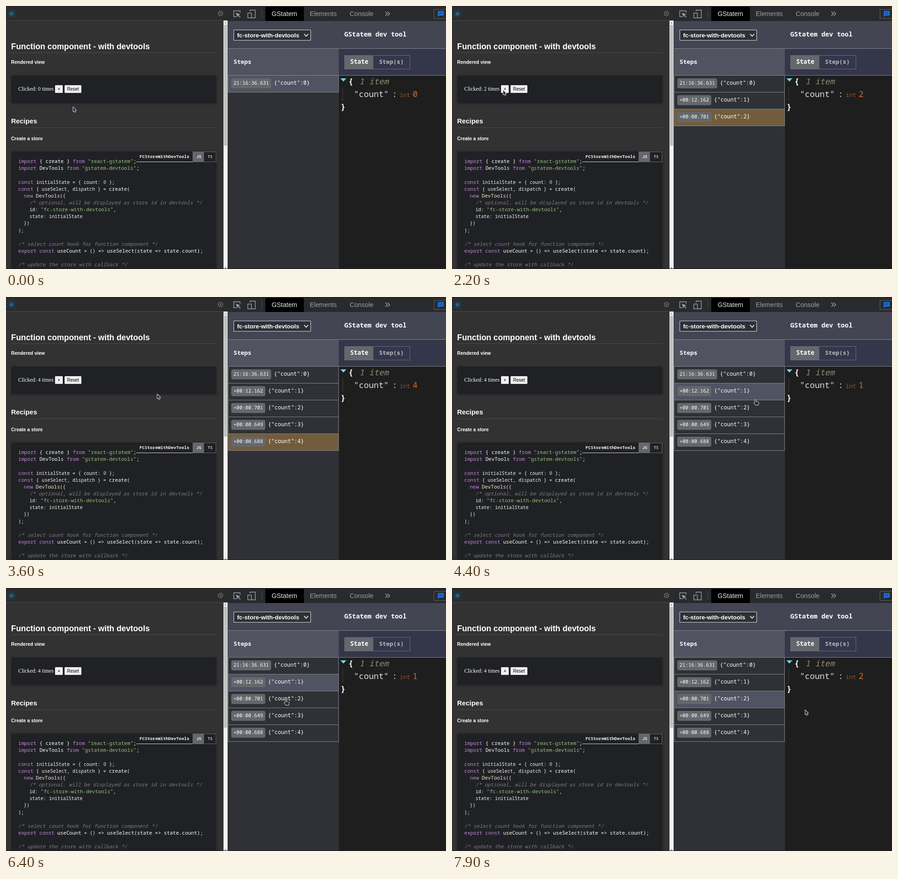
Animation of 969x578 px, one loop 8 s. Source, as an HTML page with a canvas:

```html
<!DOCTYPE html>
<html lang="en">
<head>
<meta charset="utf-8">
<title>Store with dev tools</title>
<style>
  html, body { margin: 0; width: 100%; height: 100%; overflow: hidden; background: #323232; }
  canvas { display: block; }
</style>
</head>
<body>
<canvas id="stage" width="969" height="578"></canvas>
<script>
const ctx = document.getElementById('stage').getContext('2d');
const LOOP = 8000, STEP = 100;
const MONO = '"Noto Sans Mono", "DejaVu Sans Mono", monospace';
const SANS = '"Liberation Sans", Arial, sans-serif';
const SERIF = '"Liberation Serif", "Times New Roman", serif';
const LINE = '#85878d', CHIP = '#64676c', PICKED = [80, 83, 97], FLASH = [150, 101, 25];

// Time at which each step is dispatched, and its label.
const STEPS = [
  [-LOOP, '21:16:36.631'], [1000, '+00:12.162'], [1700, '+00:00.701'],
  [2400, '+00:00.649'], [3100, '+00:00.688']
];
const PICKS = [[4400, 1], [6500, 2]];

// Pointer path: time, x, y.
const PATH = [
  [0, 147, 221], [100, 147, 221], [500, 112, 184], [3300, 112, 184], [3700, 406, 222],
  [4000, 648, 230], [4100, 664, 225], [4600, 664, 225], [4900, 893, 211], [5000, 893, 211],
  [5200, 911, 193], [5400, 901, 201], [5500, 901, 201], [5900, 674, 249], [6000, 674, 249],
  [6400, 612, 245], [6500, 612, 245], [6900, 880, 216], [7200, 910, 202], [7500, 893, 222],
  [7800, 864, 227], [7900, 777, 267], [8000, 777, 267]
];

// Code lines as [kind, text] runs; plain runs use the smaller size.
const KINDS = {
  k: '#c586e0', s: '#98c379', c: '#7b7c7e', n: '#aab4f2', f: '#ffffff', y: '#f3eecb', p: '#f4f4f4'
};
const CODE = [
  [0, 'k', 'import', 'f', ' { create } ', 'k', 'from', 'f', ' ', 's', '"react-gstatem"', 'f', ';'],
  [1, 'k', 'import', 'f', ' DevTools ', 'k', 'from', 'f', ' ', 's', '"gstatem-devtools"', 'f', ';'],
  [3, 'k', 'const', 'p', ' initialState = { count: ', 'n', '0', 'p', ' };'],
  [4, 'k', 'const', 'p', ' { useSelect, dispatch } = ', 'f', 'create', 'p', '('],
  [5, 'p', '  ', 'k', 'new', 'p', ' ', 'y', 'DevTools', 'p', '({'],
  [6, 'p', '    ', 'c', '/* optional, will be displayed as store id in devtools */'],
  [7, 'p', '    id: ', 's', '"fc-store-with-devtools"', 'p', ','],
  [8, 'p', '    state: initialState'],
  [9, 'p', '  })'],
  [10, 'p', ');'],
  [12, 'c', '/* select count hook for function component */'],
  [13, 'k', 'export', 'p', ' ', 'k', 'const', 'p', ' ', 'f', 'useCount', 'p', ' = () ', 'f', '=>', 'p', ' ',
    'f', 'useSelect', 'p', '(', 'f', 'state', 'p', ' ', 'f', '=>', 'p', ' ', 'f', 'state.count);'],
  [15, 'c', '/* update the store with callback */']
];

function box(x, y, w, h, color) {
  ctx.fillStyle = color;
  ctx.fillRect(x, y, w, h);
}

function frame(x, y, w, h, color, width = 1) {
  ctx.strokeStyle = color;
  ctx.lineWidth = width;
  ctx.strokeRect(x, y, w, h);
}

function round(x, y, w, h, r, color) {
  ctx.fillStyle = color;
  ctx.beginPath();
  ctx.roundRect(x, y, w, h, r);
  ctx.fill();
}

function text(str, x, y, size, family, color, style = '') {
  ctx.font = `${style} ${size}px ${family}`;
  ctx.fillStyle = color;
  ctx.fillText(str, x, y);
  return ctx.measureText(str).width;
}

function line(points, color, width = 1) {
  ctx.strokeStyle = color;
  ctx.lineWidth = width;
  ctx.beginPath();
  points.forEach(([x, y]) => ctx.lineTo(x, y));
  ctx.stroke();
}

function ring(x, y, r, color, width) {
  ctx.strokeStyle = color;
  ctx.lineWidth = width;
  ctx.beginPath();
  ctx.arc(x, y, r, 0, Math.PI * 2);
  ctx.stroke();
}

function card(x, y, w, h) {
  ctx.save();
  ctx.shadowColor = 'rgba(0,0,0,.4)';
  ctx.shadowBlur = 5;
  ctx.shadowOffsetY = 1;
  box(x, y, w, h, '#202124');
  ctx.restore();
}

function drawBar() {
  box(0, 0, 489, 31, '#2b2b2c');
  box(0, 31, 488, 1, '#4b4b4b');
  round(2, 7, 20, 20, 2, '#26333c');
  ring(12, 17, 2.1, '#2491c8', 1.2);
  for (let i = 0; i < 8; i++) {
    const c = Math.cos(i * Math.PI / 4), s = Math.sin(i * Math.PI / 4);
    line([[12 + c * 3.8, 17 + s * 3.8], [12 + c * 5.2, 17 + s * 5.2]], '#2491c8', 1.2);
  }
  ring(472.3, 16.5, 5, '#a5a5a5', 1);
  line([[470.3, 14.5], [474.3, 18.5]], '#a5a5a5');
  line([[474.3, 14.5], [470.3, 18.5]], '#a5a5a5');
}

function drawScrollbar() {
  box(479, 32, 9, 546, '#f3f3f3');
  box(480, 41, 7, 266, '#c0c0c0');
  ctx.fillStyle = '#606060';
  ctx.beginPath();
  ctx.moveTo(481.5, 38); ctx.lineTo(483.5, 35.5); ctx.lineTo(485.5, 38);
  ctx.moveTo(481.5, 574.5); ctx.lineTo(483.5, 577); ctx.lineTo(485.5, 574.5);
  ctx.fill();
}

function drawCode() {
  card(12, 320, 451, 262);
  box(287, 342, 125, 1, '#dadada');
  text('FCStoreWithDevTools', 294, 333.5, 9.65, MONO, '#f2f2f2', 'bold');
  box(412, 320, 24, 22, CHIP);
  frame(411.5, 320.5, 51, 22, '#686b70');
  text('JS', 419.5, 334.3, 8.6, MONO, '#ffffff', 'bold');
  text('TS', 444.3, 334.3, 8.6, MONO, '#c4c5c7', 'bold');
  for (const [row, ...runs] of CODE) {
    let x = 27;
    for (let i = 0; i < runs.length; i += 2) {
      const kind = runs[i];
      x += text(runs[i + 1], x, 345.2 + row * 15.13, kind === 'p' ? 10.27 : 11.12,
        MONO, KINDS[kind], kind === 'c' ? 'italic' : '');
    }
  }
}

function drawPage(count) {
  box(0, 0, 489, 578, '#323232');
  drawBar();
  text('Function component - with devtools', 11.3, 95.2, 17.8, SANS, '#ffffff', 'bold');
  box(11, 102, 452, 1, '#4b4b4b');
  text('Rendered view', 11.3, 127.4, 10.5, SANS, '#ffffff', 'bold');
  card(12, 153, 451, 60);
  text(`Clicked: ${count} times`, 27, 186, 11.9, SERIF, '#ffffff');
  for (const [label, x, w, pad] of [['+', 108, 17, 5.7], ['Reset', 129, 37, 5.5]]) {
    round(x, 174, w, 17, 1.5, '#efefef');
    text(label, x + pad, 186.1, 10, SANS, '#000000');
  }
  text('Recipes', 11.3, 258, 14.9, SANS, '#ffffff', 'bold');
  box(11, 267, 452, 1, '#4b4b4b');
  text('Create a store', 11.3, 295.4, 10.45, SANS, '#ffffff', 'bold');
  drawCode();
  drawScrollbar();
}

function drawTabs() {
  const gray = '#9aa0a6';
  box(489, 0, 480, 33, '#292a2d');
  // Element picker
  line([[508, 23.5], [501.5, 23.5], [501.5, 10.5], [515.5, 10.5], [515.5, 15]], gray, 1.4);
  ctx.fillStyle = gray;
  ctx.beginPath();
  ctx.moveTo(506, 14.5); ctx.lineTo(516, 18.5); ctx.lineTo(511.5, 20); ctx.lineTo(509.8, 24.5);
  ctx.fill();
  line([[511, 19.5], [516, 25]], gray, 1.8);
  // Device toggle
  line([[537.5, 12], [537.5, 9], [549, 9], [549, 26], [541, 26]], gray, 1.4);
  frame(532.5, 15.5, 8, 10.5, gray, 1.4);
  box(563, 8, 1, 18, '#4c4e52');
  box(571, 2, 85, 31, '#000000');
  text('GStatem', 585, 22, 14.25, SANS, '#e8eaed');
  text('Elements', 669, 22, 14.25, SANS, gray);
  text('Console', 757, 22, 14.25, SANS, gray);
  for (const x of [835.5, 840.5]) line([[x, 12.5], [x + 4.5, 17], [x, 21.5]], gray, 1.5);
  frame(942.5, 7.5, 40, 20, '#5f6368');
  round(951, 11, 13, 10, 1.5, '#1a73e8');
  ctx.beginPath();
  ctx.moveTo(951, 19); ctx.lineTo(951, 24); ctx.lineTo(955, 20.5);
  ctx.fill();
  box(953.5, 13.8, 8, 1, '#292a2d');
  box(953.5, 16.8, 8, 1, '#292a2d');
}

function drawHeaders() {
  box(489, 33, 480, 60, '#434652');
  round(501, 52, 170.5, 24, 1.5, '#c9cacc');
  box(502.2, 53.2, 168, 21.6, '#2e3036');
  text('fc-store-with-devtools', 509, 68.6, 13.1, SANS, '#ffffff', 'bold');
  line([[656.5, 61.5], [661, 66.5], [665.5, 61.5]], '#ffffff', 1.6);
  text('GStatem dev tool', 745, 67, 14.27, MONO, '#ffffff', 'bold');

  box(489, 94, 244, 58, '#515361');
  box(733, 94, 236, 58, '#34364a');
  box(489, 93, 480, 1, LINE);
  text('Steps', 501, 126.5, 13.15, MONO, '#ffffff', 'bold');
  frame(745.5, 108.5, 144, 30, '#6d7078');
  box(745, 108, 64, 30, CHIP);
  text('State', 758, 126.7, 13.3, MONO, '#ffffff', 'bold');
  text('Step(s)', 821.5, 126.7, 13, MONO, '#b9bac0', 'bold');
}

function drawSteps(now, last, picked) {
  box(489, 152, 244, 426, '#2f3136');
  for (let i = 0; i <= last; i++) {
    const [born, label] = STEPS[i], y = 152 + i * 37;
    if (i === picked) {
      const glow = Math.max(0, 1 - (now - born) / 1000);
      box(490, y + 1, 242, 36, `rgb(${PICKED.map((v, c) => v + (FLASH[c] - v) * glow)})`);
    }
    box(489, y + 37, 244, 1, LINE);
    const w = i ? 75 : 88;
    round(496, y + 7, w, 22, 4, CHIP);
    text(label, 501, y + 21, 10.85, MONO, '#ffffff');
    text(`{"count":${i}}`, 496 + w + 6, y + 21, 12, MONO, '#ffffff');
  }
  const h = 37 * (last + 1);
  box(489, 152, 1, h, LINE);
  box(732, 152, 1, h, LINE);
}

function drawState(count) {
  box(733, 152, 236, 426, '#1e1e1e');
  box(489, 152, 480, 1, LINE);
  ctx.fillStyle = '#66d9ef';
  ctx.beginPath();
  ctx.moveTo(736.5, 159); ctx.lineTo(749.5, 159); ctx.lineTo(743, 166);
  ctx.fill();
  text('{', 754, 172.2, 17.9, MONO, '#f9f8f5', 'bold');
  text('1 item', 778, 172.2, 17.9, MONO, '#938b70', 'italic');
  box(741, 178, 1, 31, '#444440');
  text('"count"', 766, 200, 18.3, MONO, '#dededa');
  text(':', 850.5, 200, 18.3, MONO, '#dededa');
  text('int', 867, 200, 12.9, MONO, '#9c4f2f');
  text(String(count), 895.6, 200, 18.3, MONO, '#d9682f');
  text('}', 737, 228.2, 17.9, MONO, '#f9f8f5', 'bold');
}

function outline(path) {
  ctx.lineJoin = 'round';
  ctx.strokeStyle = '#e4e4e4';
  ctx.lineWidth = 1.8;
  ctx.stroke(path);
  ctx.fillStyle = '#2a2a2c';
  ctx.fill(path);
  ctx.lineJoin = 'miter';
}

const ARROW = new Path2D('M.8 1.2V10.7L3 8.9 4.6 12.2 6.2 11.4 4.7 8.2H7.4Z');
const HAND = new Path2D('M3.2 1.2Q4.6 .4 5 1.6V5L10 5.8Q11.6 6.3 11.2 8L10.4 12H5L1.2 8.2Q1 6.8 2.4 7.2L3.2 7.8Z');

function drawPointer(now, last) {
  const i = Math.max(1, PATH.findIndex(p => p[0] >= now));
  const [t0, x0, y0] = PATH[i - 1], [t1, x1, y1] = PATH[i];
  const k = (now - t0) / (t1 - t0);
  const x = x0 + (x1 - x0) * k, y = y0 + (y1 - y0) * k;
  const overRow = x > 489 && x < 733 && y > 152 && y < 189 + last * 37;
  ctx.save();
  ctx.translate(x, y);
  outline(overRow ? HAND : ARROW);
  ctx.restore();
}

function draw(now) {
  const last = STEPS.filter(s => s[0] <= now).length - 1;
  const pick = PICKS.filter(p => p[0] <= now).pop();
  const picked = pick ? pick[1] : last;
  drawPage(last);
  drawTabs();
  drawHeaders();
  drawSteps(now, last, picked);
  drawState(picked);
  box(0, 0, 969, 1, '#1c1c1e');
  box(0, 577, 969, 1, '#24191f');
  drawPointer(now, last);
}

const start = performance.now();
function tick() {
  let now = Math.floor((performance.now() - start) % LOOP / STEP) * STEP;
  // The view stalls briefly after the third click.
  if (now > 2400 && now < 2900) now = 2400;
  draw(now);
  requestAnimationFrame(tick);
}
tick();
</script>
</body>
</html>
```
